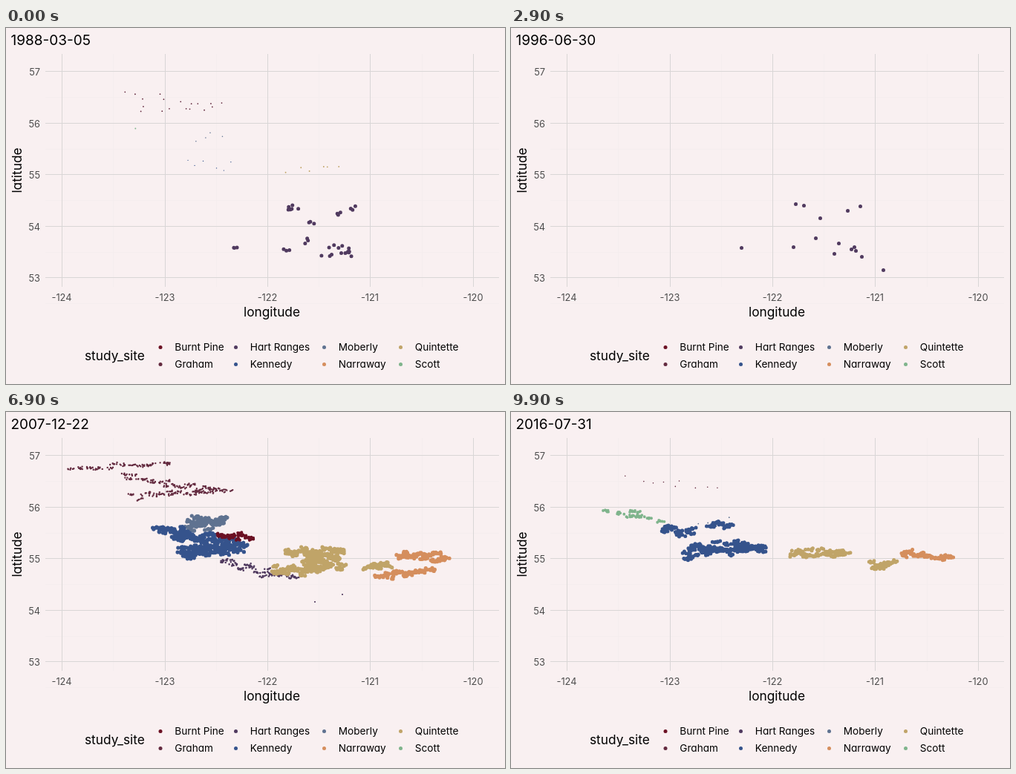
These frames come from a looping animation (672 px wide and 480 px high, 10000 ms). An HTML page:

```html
<!DOCTYPE html>
<html lang="en">
<head>
<meta charset="utf-8">
<title>Study sites over time</title>
<style>
  html, body { margin: 0; width: 100%; height: 100%; overflow: hidden; background: #f9f0f1; }
  svg { display: block; width: 672px; height: 480px; }
  text { font-family: Inter, "Open Sans", sans-serif; font-feature-settings: "cv11"; fill: #000; }
  .date { font-size: 19px; }
  .title { font-size: 17.3px; }
  .key { font-size: 13.6px; }
  .tick { font-size: 12.8px; fill: #4d4d4d; }
  .major { stroke: #d9d6d6; }
  .minor { stroke: #f5edee; }
</style>
</head>
<body>
<svg id="stage" viewBox="0 0 672 480"></svg>
<script>
const stage = document.getElementById('stage');
const LOOP = 10000, STEP = 100, LAST = 99, DAYS = 10375;
const START = Date.UTC(1988, 2, 5);

// `sizes` holds the dot radius of a site in each era.
const sites = {
  'Burnt Pine': { color: '#6b1023', sizes: [0, 2.6, 2.1, 2.3, 0] },
  'Graham': { color: '#632a3f', sizes: [0.9, 1.7, 1.2, 1.6, 0.8] },
  'Hart Ranges': { color: '#503a5f', sizes: [0, 2.6, 1.3, 0.9, 0] },
  'Kennedy': { color: '#35538c', sizes: [0.7, 2.6, 2.6, 2.3, 2.5] },
  'Moberly': { color: '#5f7290', sizes: [0.8, 2.6, 2.6, 2.2, 0.9] },
  'Narraway': { color: '#d58e5d', sizes: [0, 0, 2.6, 2.3, 2.5] },
  'Quintette': { color: '#c0a468', sizes: [0.95, 2.6, 2.6, 2.2, 2.5] },
  'Scott': { color: '#7fb48c', sizes: [0.95, 0, 0, 0, 1.9] }
};
const layers = ['Hart Ranges', 'Moberly', 'Kennedy', 'Graham', 'Burnt Pine', 'Narraway', 'Quintette', 'Scott'];

// Dots gather from `from`, are complete at `full` and have shrunk away by `gone`.
const eras = [
  { from: 0, full: 0, gone: 1200, density: 0.1 },
  { from: 4400, full: 5600, gone: 6900, density: 0.085 },
  { from: 5600, full: 6900, gone: 8500, density: 0.14 },
  { from: 6900, full: 8500, gone: 9900, density: 0.15 },
  { from: 8500, full: 9900, gone: LOOP, density: 0.12 }
];
const quiet = { from: 200, full: 1200, hold: 4400, gone: 5400 };

let seed = 88;
function random() {
  seed = (seed + 0x6d2b79f5) | 0;
  let v = Math.imul(seed ^ (seed >>> 15), seed | 1);
  v ^= v + Math.imul(v ^ (v >>> 7), v | 61);
  return ((v ^ (v >>> 14)) >>> 0) / 4294967296;
}
const jitter = reach => (random() + random() - 1) * reach;
const mix = (a, b, u) => a + (b - a) * u;

function add(tag, attrs, label) {
  const node = document.createElementNS('http://www.w3.org/2000/svg', tag);
  for (const name in attrs) node.setAttribute(name, attrs[name]);
  if (label) node.textContent = label;
  return stage.appendChild(node);
}

// Grid and axes: one line per half degree, whole degrees stronger and labelled
const gridX = degree => Math.round(75.2 + 138.4 * (degree + 124)) + 0.5;
const gridY = degree => Math.round(58.2 + 69.55 * (57 - degree)) + 0.5;
function drawGrid(offset, type) {
  for (let i = 0; i < 5 - offset; i++) {
    const x = gridX(-124 + i + offset), y = gridY(57 - i - offset);
    add('line', { x1: x, x2: x, y1: 35, y2: 349, class: type });
    add('line', { x1: 53, x2: 664, y1: y, y2: y, class: type });
    if (offset) continue;
    add('text', { x: x - 0.5, y: 367.5, class: 'tick', 'text-anchor': 'middle' }, String(i - 124));
    add('text', { x: 46, y: y + 5, class: 'tick', 'text-anchor': 'end' }, String(57 - i));
  }
}
drawGrid(0.5, 'minor');
drawGrid(0, 'major');
add('text', { x: 358, y: 389, class: 'title', 'text-anchor': 'middle' }, 'longitude');
add('text', { transform: 'translate(21 192) rotate(-90)', class: 'title', 'text-anchor': 'middle' }, 'latitude');
add('text', { x: 106, y: 448, class: 'title' }, 'study_site');
const date = add('text', { x: 6.5, y: 23, class: 'date' });

const columns = [208, 309.5, 428.5, 531.5];
Object.keys(sites).forEach((name, i) => {
  const x = columns[i >> 1], y = 430.5 + 23 * (i % 2);
  add('circle', { cx: x, cy: y, r: 2.5, fill: sites[name].color });
  add('text', { x: x + 19.3, y: y + 4.7, class: 'key' }, name);
});

for (const name of layers) {
  sites[name].path = add('path', { fill: sites[name].color });
  sites[name].dots = [];
}

function addDot(site, x, y, r, { from, full, hold = full, gone }) {
  sites[site].dots.push({
    x, y, r, hold,
    born: mix(from, full, 0.02 + 0.98 * random()),
    end: mix(hold, gone, 0.3 + 0.7 * random())
  });
}

// A home range runs along a line; animals gather in flat clumps on it.
function home(site, [x1, y1], [x2, y2], spread, first, last) {
  const length = Math.hypot(x2 - x1, y2 - y1);
  for (let e = first; e <= last; e++) {
    const r = sites[site].sizes[e], sparse = r < 1;
    if (!r) continue;
    const clumpSize = sparse ? 1 : 7;
    const crowd = eras[e].density * Math.min(1, r / 2.3) * (length + 6) * (2 * spread + 1);
    const clumps = sparse ? Math.ceil(length / 16) : Math.ceil(crowd / clumpSize);
    for (let c = 0; c < clumps; c++) {
      const u = (c + random()) / clumps;
      const x = mix(x1, x2, u), y = mix(y1, y2, u) + jitter(spread * 1.15);
      for (let i = 0; i < clumpSize; i++) addDot(site, x + jitter(7), y + jitter(2.5), r, eras[e]);
    }
  }
}

home('Graham', [85, 77], [225, 70], 4, 1, 3);
home('Graham', [155, 87], [285, 106], 6, 0, 4);
home('Graham', [170, 113], [300, 106], 6, 0, 2);
home('Moberly', [244, 153], [295, 146], 10, 0, 4);
home('Burnt Pine', [285, 165], [330, 170], 5, 1, 3);
home('Kennedy', [234, 188], [320, 182], 10, 0, 4);
home('Kennedy', [203, 155], [245, 163], 6, 2, 4);
home('Kennedy', [225, 168], [305, 172], 7, 2, 2);
home('Kennedy', [300, 182], [341, 182], 9, 3, 4);
home('Kennedy', [266, 153], [299, 154], 4, 4, 4);
home('Hart Ranges', [290, 200], [392, 224], 8, 1, 3);
home('Quintette', [375, 190], [455, 188], 6, 0, 4);
home('Quintette', [402, 202], [453, 203], 10, 1, 3);
home('Quintette', [358, 213], [424, 215], 6, 2, 3);
home('Quintette', [484, 207], [516, 206], 5, 1, 4);
home('Quintette', [515, 208], [557, 203], 7, 3, 3);
home('Narraway', [526, 191], [595, 197], 5, 2, 4);
home('Narraway', [502, 222], [575, 211], 4, 2, 2);
home('Narraway', [574, 189], [614, 188], 7, 3, 3);
home('Narraway', [562, 212], [631, 209], 6, 3, 3);
home('Narraway', [476, 244], [530, 228], 3, 3, 3);
home('Scott', [164, 136], [173, 134], 3, 0, 4);
home('Scott', [125, 133], [205, 147], 2, 4, 4);

// Collared animals of the quiet years; early fixes lie near where each one ends up.
const collared = [
  [416, 256], [453, 246], [383, 237], [394, 239], [470, 240], [410, 283], [380, 295], [310, 296],
  [441, 290], [435, 304], [458, 298], [462, 295], [464, 300], [472, 308], [501, 326]
];
collared.forEach(([x, y], i) => {
  addDot('Hart Ranges', x + 0.5, y + 0.5, 2.5, quiet);
  if (i < 2) addDot('Hart Ranges', x, y, 1.1, { from: quiet.hold, full: 5000, hold: 8500, gone: 9800 });
  if (i < collared.length - 2)
    for (let n = 0; n < 3; n++) addDot('Hart Ranges', x - 2 + jitter(12), y + 4 + jitter(7), 2.5, eras[0]);
});

function disc({ x, y }, r) {
  const s = r.toFixed(2), d = (2 * r).toFixed(2);
  return `M${(x - r).toFixed(2)} ${y.toFixed(2)}a${s} ${s} 0 1 0 ${d} 0a${s} ${s} 0 1 0 -${d} 0`;
}

function render(frame) {
  const t = frame * STEP;
  date.textContent = new Date(START + Math.floor(frame * DAYS / LAST) * 864e5).toISOString().slice(0, 10);
  for (const name of layers) {
    let d = '';
    for (const dot of sites[name].dots) {
      const scale = Math.min(1, 1 - (t - dot.hold) / (dot.end - dot.hold));
      if (t >= dot.born && scale > 0) d += disc(dot, dot.r * scale);
    }
    sites[name].path.setAttribute('d', d);
  }
}

const began = performance.now();
let shown = 0;
function tick() {
  const frame = Math.floor(((performance.now() - began) % LOOP) / STEP);
  if (frame !== shown) render(shown = frame);
  requestAnimationFrame(tick);
}
render(0);
requestAnimationFrame(tick);
</script>
</body>
</html>
```
